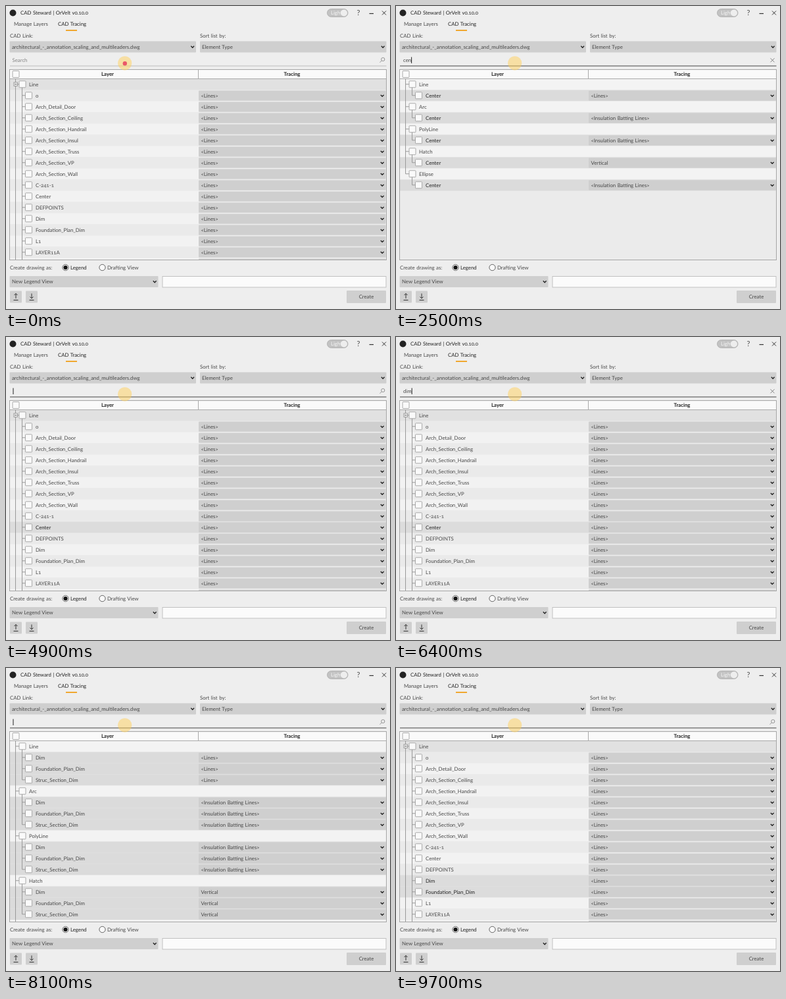
An HTML page that plays this animation: 584 px wide and 460 px high, repeating every 9.9 s.

```html
<!DOCTYPE html>
<html lang="en">
<head>
<meta charset="utf-8">
<title>Layer tracing search</title>
<style>
  html, body { margin: 0; width: 100%; height: 100%; overflow: hidden; background: #eee; }
  svg { display: block; width: 584px; height: 460px; }
  text {
    font: 7.8px Lato, "Open Sans", sans-serif;
    word-spacing: .5px;
    font-variant-numeric: oldstyle-nums;
    text-rendering: geometricPrecision;
    fill: #484848;
    white-space: pre;
  }
  .bold { font-weight: 700; fill: #222; }
  .strong { fill: #222; }
  .mid { text-anchor: middle; }
</style>
</head>
<body>
<svg id="stage" viewBox="0 0 584 460" xmlns="http://www.w3.org/2000/svg"></svg>
<script>
const NS = 'http://www.w3.org/2000/svg';
const stage = document.getElementById('stage');
const LOOP = 9900;
const ROW = 17, TOP = 110.5, BOTTOM = 385;

function add(parent, tag, attrs, content) {
  const node = document.createElementNS(NS, tag);
  for (const key in attrs) node.setAttribute(key, attrs[key]);
  if (content !== undefined) node.textContent = content;
  return parent.appendChild(node);
}
const group = (parent = stage) => add(parent, 'g', {});
const rect = (p, x, y, width, height, fill, extra) =>
  add(p, 'rect', { x, y, width, height, fill, ...extra });
const label = (p, x, y, content, cls = '') => add(p, 'text', { x, y, class: cls }, content);
const stroke = (p, d, color = '#999', width = 1) =>
  add(p, 'path', { d, fill: 'none', stroke: color, 'stroke-width': width });
const circle = (p, cx, cy, r, fill, extra) => add(p, 'circle', { cx, cy, r, fill, ...extra });
const chevron = (p, x, y) => stroke(p, `M${x - 2.4} ${y - 1.2}l2.4 2.4l2.4 -2.4`, '#222', 1.4);
const checkbox = (p, x, y) =>
  rect(p, x, y, 10, 10, '#fafafa', { stroke: '#a2a2a2', 'stroke-width': .9, rx: .8 });

function select(p, x, y, width, height, content, textX) {
  rect(p, x, y, width, height, '#cfcfcf', { rx: 1 });
  label(p, textX, y + height / 2 + 2.9, content);
  chevron(p, x + width - 5.3, y + height / 2);
}

function drawHeader() {
  rect(stage, 0, 0, 584, 460, '#eee');
  circle(stage, 10.5, 10.5, 5, '#222');
  label(stage, 22, 13.2, 'CAD Steward | OrVelt v0.10.0', 'strong');
  rect(stage, 488.5, 4.5, 31.5, 12, '#c2c2c2', { rx: 6, stroke: '#aaa', 'stroke-width': .8 });
  label(stage, 494, 13.2, 'Light').style.fill = '#f8f8f8';
  circle(stage, 514, 10.5, 5, '#eee');
  label(stage, 536, 14, '?', 'mid').style.fontSize = '11px';
  stroke(stage, 'M552.5 11.5h6.5', '#333', 1.2);
  stroke(stage, 'M572 7.5l6 6m0 -6l-6 6', '#333');
  label(stage, 12, 30, 'Manage Layers');
  label(stage, 79, 30, 'CAD Tracing', 'strong');
  rect(stage, 91, 36, 17, 2, '#f0a830');
  label(stage, 6, 48, 'CAD Link:');
  label(stage, 295, 48, 'Sort list by:');
  select(stage, 5.5, 53.5, 283.5, 17, 'architectural_-_annotation_scaling_and_multileaders.dwg', 9);
  select(stage, 295, 53.5, 283.5, 17, 'Element Type', 298);
}

function drawFooter() {
  label(stage, 6, 400, 'Create drawing as:');
  for (const x of [90.5, 146.5])
    circle(stage, x, 397, 4.6, '#fafafa', { stroke: '#555', 'stroke-width': .9 });
  circle(stage, 90.5, 397, 3.1, '#111');
  label(stage, 98, 400, 'Legend', 'strong');
  label(stage, 154, 400, 'Drafting View');
  select(stage, 5.5, 410, 226, 17, 'New Legend View', 9);
  rect(stage, 238, 410.5, 340, 16.5, '#fbfbfb', { stroke: '#bcbcbc', 'stroke-width': .9 });
  for (const x of [6, 30]) rect(stage, x, 432.5, 18, 18, '#cfcfcf', { rx: 1 });
  stroke(stage, 'M15 444v-7.5m-2.5 2.5l2.5 -2.5l2.5 2.5M11.5 446.5h7', '#333');
  stroke(stage, 'M39 436.5v7.5m-2.5 -2.5l2.5 2.5l2.5 -2.5M35.5 446.5h7', '#333');
  rect(stage, 518, 432, 60, 19, '#cfcfcf', { rx: 1 });
  label(stage, 548, 444.3, 'Create', 'mid');
}

const rowMid = i => TOP + ROW * i + 8.3;

function childRow(p, i, name, tracing, fill, strong) {
  const y = rowMid(i);
  rect(p, 6, y - 8.3, 572, ROW, fill);
  stroke(p, `M24.5 ${y}h5`);
  checkbox(p, 29.5, y - 5);
  label(p, 45, y + 3, name, strong ? 'strong' : '');
  select(p, 293, y - 7.3, 284.5, 15.2, tracing, 296.5);
}

function groupRow(p, i, name, fill) {
  const y = rowMid(i);
  rect(p, 6, y - 8.3, 572, ROW, fill);
  stroke(p, `M14.5 ${y}h6`);
  checkbox(p, 20, y - 5);
  label(p, 35, y + 3, name);
}

const layers = ['o', 'Arch_Detail_Door', 'Arch_Section_Ceiling', 'Arch_Section_Handrail',
  'Arch_Section_Insul', 'Arch_Section_Truss', 'Arch_Section_VP', 'Arch_Section_Wall', 'C-241-1',
  'Center', 'DEFPOINTS', 'Dim', 'Foundation_Plan_Dim', 'L1', 'LAYER11A', ''];
const batting = '<Insulation Batting Lines>';
const elements = [['Line', '<Lines>'], ['Arc', batting], ['PolyLine', batting],
  ['Hatch', 'Vertical'], ['Ellipse', batting]];

function listGroup() {
  return add(stage, 'g', { 'clip-path': 'url(#listClip)' });
}

function fullList(marked = []) {
  const g = listGroup();
  groupRow(g, 0, 'Line', '#e1e1e1');
  layers.forEach((name, i) => {
    const on = marked.includes(name);
    childRow(g, i + 1, name, '<Lines>', on ? '#dcdcdc' : i % 2 ? '#f2f2f2' : '#eaeaea', on);
  });
  stroke(g, `M14.5 111V${BOTTOM}M24.5 124V${BOTTOM}`);
  rect(g, 12, 116, 5.5, 5.5, '#f4f4f4', { stroke: '#888', 'stroke-width': .8 });
  stroke(g, 'M13.2 118.8h3.2', '#444', .9);
  return g;
}

function filteredList(names, strong) {
  const g = listGroup();
  const span = names.length + 1;
  elements.forEach(([title, tracing], k) => {
    const first = k * span;
    groupRow(g, first, title, '#f3f3f3');
    names.forEach((name, j) => childRow(g, first + j + 1, name, tracing, '#dbdbdb', strong));
    stroke(g, `M24.5 ${rowMid(first) + 5}V${rowMid(first + names.length)}`);
  });
  stroke(g, `M14.5 111V${rowMid(span * (elements.length - 1))}`);
  return g;
}

drawHeader();

const clip = add(add(stage, 'defs', {}), 'clipPath', { id: 'listClip' });
rect(clip, 6, 110.5, 572, BOTTOM - 110.5, '#000');
rect(stage, 5.5, 96.5, 573, 289, '#ebebeb');
const lists = {
  full: fullList(),
  cen: filteredList(['Center'], true),
  afterCen: fullList(['Center']),
  dim: filteredList(['Dim', 'Foundation_Plan_Dim', 'Struc_Section_Dim'], false),
  afterDim: fullList(['Dim', 'Foundation_Plan_Dim'])
};
rect(stage, 6, 97, 572, 13.5, '#fafafa');
stroke(stage, 'M6 110.5H578M292.5 97V110.5', '#aaa');
checkbox(stage, 10, 98.5);
label(stage, 154.5, 106.3, 'Layer', 'bold mid');
label(stage, 435, 106.3, 'Tracing', 'bold mid');
rect(stage, 5.5, 96.5, 573, 289, 'none', { stroke: '#a6a6a6' });

drawFooter();

const underline = stroke(stage, 'M6 91H578.5', '#bbb');
const placeholder = label(stage, 9.5, 85, 'Search');
placeholder.style.fill = '#858585';
const lens = group();
circle(lens, 573.3, 81, 2.6, 'none', { stroke: '#888', 'stroke-width': .9 });
stroke(lens, 'M571.3 83l-2.8 2.8', '#888', .9);
const cross = group();
stroke(cross, 'M569.5 79.3l6 6m0 -6l-6 6', '#777', .9);
const query = label(stage, 11, 85, '');
const caret = rect(stage, 0, 77.5, 1, 9.5, '#222');
circle(stage, 180.7, 86.8, 10.6, '#ffcf5a', { opacity: .5 });
const press = circle(stage, 180.8, 87.3, 3.2, '#ea5668');

// Schedules: each entry holds from its time until the next one.
const typing = [[0, ''], [1800, 'c'], [2100, 'ce'], [2200, 'cen'], [2700, 'cent'], [2900, 'cente'],
  [3000, 'center'], [3800, 'cente'], [4000, 'cent'], [4200, 'cen'], [4300, 'ce'], [4400, 'c'],
  [4500, ''], [6200, 'd'], [6300, 'di'], [6400, 'dim'], [7800, 'di'], [7900, 'd'], [8100, '']];
const views = [[0, 'full'], [2500, 'cen'], [4900, 'afterCen'], [6800, 'dim'], [8500, 'afterDim']];
const caretToggles = [800, 1400, 1800, 3600, 3800, 5200, 5700, 6900, 7400, 8600, 9100, 9700];

const at = (schedule, t) => schedule.filter(([start]) => start <= t).pop()[1];
const show = (node, on) => { node.style.display = on ? '' : 'none'; };

function render(t) {
  const word = at(typing, t);
  const view = at(views, t);
  const focused = t >= 800;
  for (const key in lists) show(lists[key], key === view);
  query.textContent = word;
  caret.setAttribute('x', word ? 11 + query.getComputedTextLength() : 10.5);
  show(caret, caretToggles.filter(time => time <= t).length % 2 === 1);
  show(placeholder, !focused);
  underline.setAttribute('stroke', focused ? '#444' : '#bbb');
  show(lens, !word);
  show(cross, word);
  press.setAttribute('opacity', Math.max(0, 1 - Math.floor(t / 100) / 4));
}

const start = performance.now();
function tick() {
  render((performance.now() - start) % LOOP);
  requestAnimationFrame(tick);
}
tick();
</script>
</body>
</html>
```
